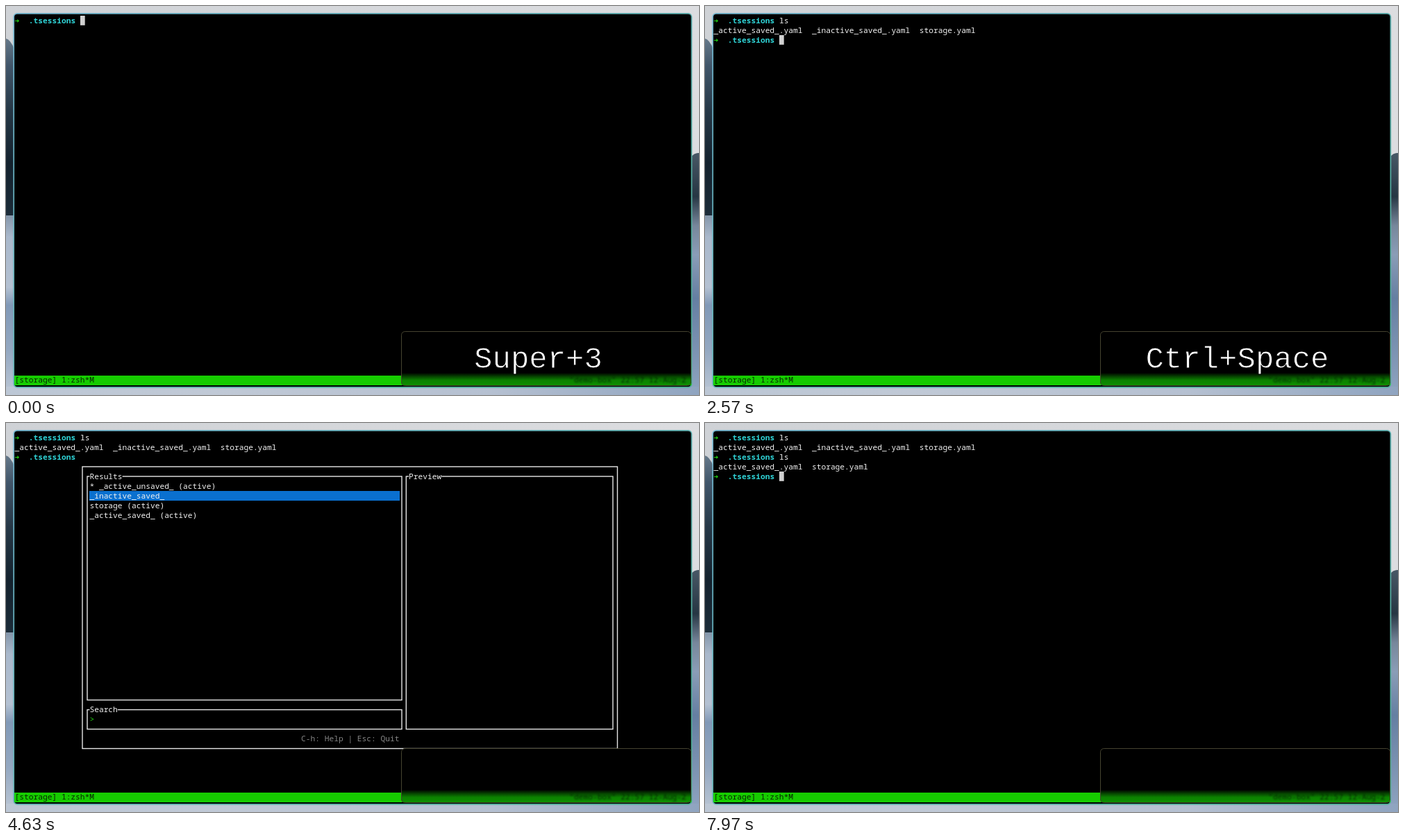
Recreate the animation shown at these times as an HTML page. Size 998x561 px, loop 8 s.

```html
<!DOCTYPE html>
<html lang="en">
<head>
<meta charset="utf-8">
<title>Terminal session manager</title>
<style>
  html, body { margin: 0; width: 100%; height: 100%; overflow: hidden; background: #000; }
  svg { display: block; width: 998px; height: 561px; }
  text { white-space: pre; font: 500 11.23px "Noto Sans Mono", "DejaVu Sans Mono", monospace; fill: #f2f2f2; }
  .arrow { font: bold 11.2px "DejaVu Sans Mono", monospace; fill: #23d613; }
  .dir { font-weight: bold; fill: #2fd3d6; }
  .green { fill: #23d613; }
  .dim { fill: #858585; }
  .dark { fill: #062400; }
  #keys { font: 44px "Liberation Mono", "Courier New", monospace; fill: #fff; stroke: #000; stroke-width: .8px; text-anchor: middle; }
  .frame { fill: none; stroke: #e6e6e6; stroke-width: 1.4; }
</style>
</head>
<body>
<svg viewBox="0 0 998 561">
  <defs>
    <linearGradient id="top"><stop stop-color="#cfd2d6"/><stop offset="1" stop-color="#dcdde0"/></linearGradient>
    <linearGradient id="bottom">
      <stop stop-color="#bcc7d5"/><stop offset=".3" stop-color="#c0c9d6"/>
      <stop offset=".7" stop-color="#b5c0d1"/><stop offset="1" stop-color="#8fa4c0"/>
    </linearGradient>
    <linearGradient id="left" x2="0" y2="1">
      <stop stop-color="#cfd2d6"/><stop offset=".1" stop-color="#cdd1d7"/>
    </linearGradient>
    <linearGradient id="leftHill" x2="0" y2="1">
      <stop stop-color="#66798a"/><stop offset=".15" stop-color="#41566a"/>
      <stop offset=".4" stop-color="#263847"/><stop offset=".7" stop-color="#14222e"/>
      <stop offset="1" stop-color="#1c2c39"/>
    </linearGradient>
    <linearGradient id="leftMist" x2="0" y2="1">
      <stop stop-color="#8496aa"/><stop offset=".12" stop-color="#a9b8cb"/>
      <stop offset=".4" stop-color="#b4c1d2"/><stop offset=".5" stop-color="#8199b7"/>
      <stop offset=".75" stop-color="#94a8c1"/><stop offset="1" stop-color="#bcc7d5"/>
    </linearGradient>
    <linearGradient id="rightHill" x2="0" y2="1">
      <stop stop-color="#485866"/><stop offset=".18" stop-color="#263643"/>
      <stop offset=".3" stop-color="#77879b"/><stop offset=".42" stop-color="#8a9db7"/>
      <stop offset=".6" stop-color="#657fa2"/><stop offset="1" stop-color="#8fa4c0"/>
    </linearGradient>
    <linearGradient id="edge" x2="1" y2="1">
      <stop stop-color="#72b5cf"/><stop offset="1" stop-color="#4cae94"/>
    </linearGradient>
    <linearGradient id="glow" x2="0" y2="1">
      <stop stop-color="#000"/><stop offset=".3" stop-color="#064500"/>
      <stop offset=".6" stop-color="#0c8200"/><stop offset="1" stop-color="#0e8e00"/>
    </linearGradient>
    <filter id="soft"><feGaussianBlur stdDeviation="1.1"/></filter>
  </defs>

  <rect width="998" height="561" fill="url(#top)"/>
  <path d="M0 47Q6 48 12 62V304H0Z" fill="url(#leftHill)"/>
  <rect y="302" width="12" height="259" fill="url(#leftMist)"/>
  <path d="M986 218Q992 211 998 212V561H986Z" fill="url(#rightHill)"/>
  <rect y="549" width="998" height="12" fill="url(#bottom)"/>
  <rect x="11.2" y="10.8" width="976.2" height="539" rx="5" stroke="url(#edge)" stroke-width="1.7"/>
  <rect x="12" y="533" width="975" height="14" fill="#16cc00"/>

  <g id="shell"></g>
  <g id="popup"></g>

  <rect x="569.5" y="469.5" width="417" height="78" rx="5"/>
  <rect x="570" y="529" width="416" height="18" fill="url(#glow)"/>
  <g id="clock" filter="url(#soft)" opacity=".9"></g>
  <rect x="569.5" y="469.5" width="417" height="78" rx="5" fill="none" stroke="#45432f"/>
  <text id="keys" x="766.5" y="522"></text>
</svg>

<script>
const CELL = 6.74, ROW = 14, LEFT = 12.6, TOP = 14, DURATION = 8000;
const $ = id => document.getElementById(id);

const colX = col => LEFT + col * CELL;
const rowY = row => TOP + row * ROW;
const rect = (x, y, w, h, attrs) =>
  `<rect x="${x}" y="${y}" width="${w}" height="${h}" ${attrs}/>`;
const put = (col, row, text, cls = "") =>
  `<text class="${cls}" x="${colX(col)}" y="${rowY(row) + 10.6}">${text.replace(">", "&gt;")}</text>`;
const prompt = (row, command = "") =>
  put(0, row, "➜", "arrow") + put(3, row, ".tsessions", "dir") + put(14, row, command);
const cursor = (col, row) => rect(colX(col), rowY(row), CELL, 13.8, 'fill="#d0d0d0"');
const box = (x1, y1, x2, y2) => rect(x1, y1, x2 - x1, y2 - y1, 'class="frame"');
const title = (col, row, text) =>
  rect(colX(col), rowY(row), text.length * CELL, ROW, "") + put(col, row, text);

const LS_BEFORE = "_active_saved_.yaml  _inactive_saved_.yaml  storage.yaml";
const LS_AFTER = "_active_saved_.yaml  storage.yaml";

// Finished listings first, then the command being typed.
function shell({ outputs, typed, open }) {
  let row = 0, svg = "";
  for (const output of outputs) {
    svg += prompt(row, "ls") + put(0, row + 1, output);
    row += 2;
  }
  return svg + prompt(row, typed) + (open ? "" : cursor(14 + typed.length, row));
}

function popup(sessions, selected) {
  const list = sessions.map((name, i) =>
    (i === selected ? rect(120, rowY(5 + i), 447, ROW, 'fill="#0a70cf"') : "") +
    put(16, 5 + i, name)).join("");
  return rect(110, 63, 770.5, 406.5, 'fill="#000"') +
    box(110, 63, 880.5, 469.5) + box(117, 77, 570, 399.5) +
    box(117, 413.5, 570, 441.5) + box(576.3, 77, 874, 441.5) +
    title(16, 4, "Results") + title(16, 28, "Search") + title(84.2, 4, "Preview") +
    list + put(16, 29, ">", "green") + put(61.2, 31, "C-h: Help | Esc: Quit", "dim");
}

const ACTIVE = "* _active_unsaved_ (active)";
const REST = ["storage (active)", "_active_saved_ (active)"];
const ALL = [ACTIVE, "_inactive_saved_", ...REST];

// [start ms, changes carried forward until overridden]
const STEPS = [
  [0, { keys: "Super+3", outputs: [], typed: "", open: false, list: ALL, selected: 0 }],
  [750, { keys: "l", typed: "l" }],
  [870, { keys: "l s", typed: "ls" }],
  [1050, { keys: "l s Enter", typed: "", outputs: [LS_BEFORE] }],
  [2000, { keys: "" }],
  [2350, { keys: "Ctrl+Space" }],
  [2800, { open: true }],
  [3550, { keys: "" }],
  [4200, { selected: 1 }],
  [5150, { keys: "Enter", list: [ACTIVE, ...REST], selected: 0 }],
  [6150, { keys: "Escape", open: false }],
  [6850, { keys: "l", typed: "l" }],
  [6950, { keys: "l s", typed: "ls" }],
  [7100, { keys: "l s Enter", typed: "", outputs: [LS_BEFORE, LS_AFTER] }],
  [7900, { keys: "" }],
];

$("clock").innerHTML = put(118.5, 37, '"demo-box" 22:57 12-Aug-2', "dark");
const status = put(0, 37, "[storage] 1:zsh*M", "dark");

let shown = -1;
const begin = performance.now();
function draw() {
  const time = Math.max(0, performance.now() - begin) % DURATION;
  const step = STEPS.filter(([start]) => start <= time).length;
  if (step !== shown) {
    const state = Object.assign({}, ...STEPS.slice(0, step).map(([, change]) => change));
    $("shell").innerHTML = shell(state) + status;
    $("popup").innerHTML = state.open ? popup(state.list, state.selected) : "";
    $("keys").textContent = state.keys;
    shown = step;
  }
  requestAnimationFrame(draw);
}
draw();
</script>
</body>
</html>
```
